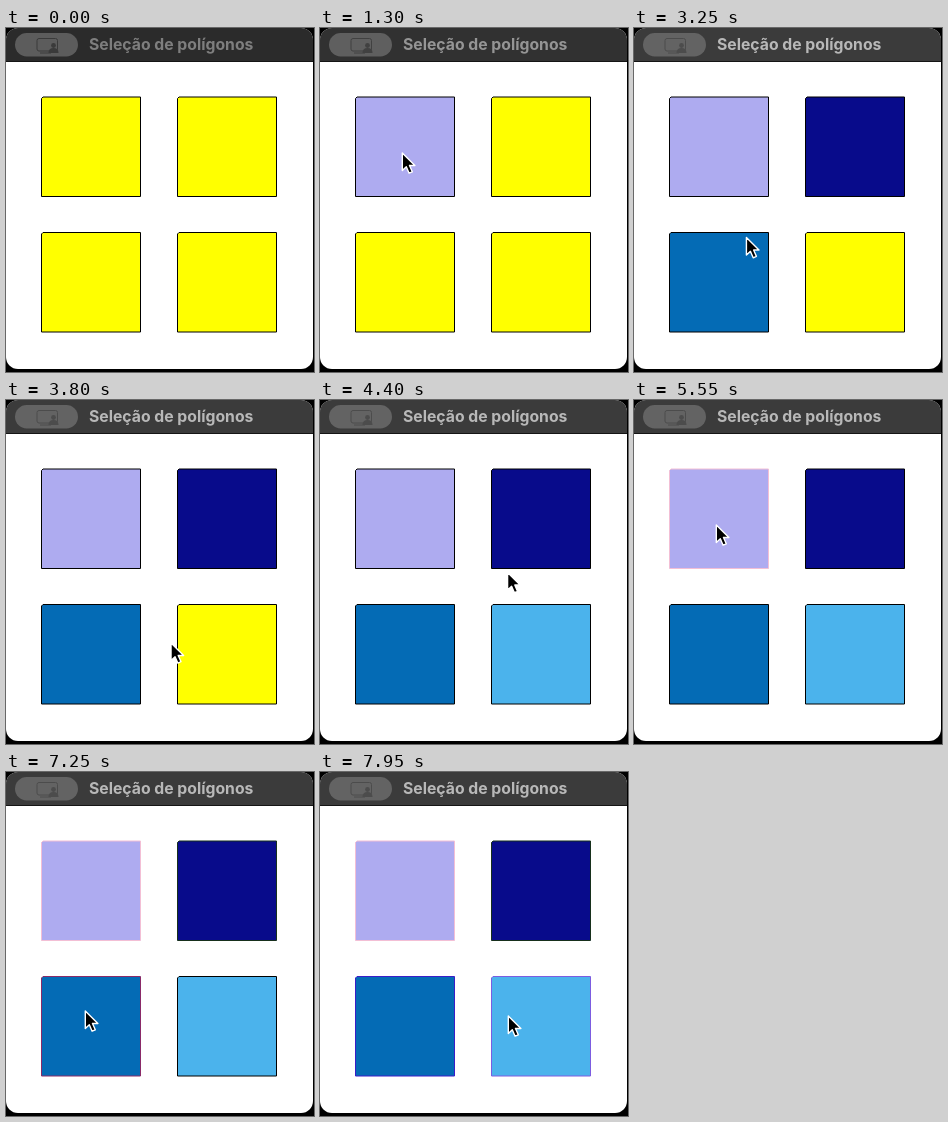
An HTML page that plays this animation: 308 px wide and 344 px high, repeating every 8 s.

```html
<!DOCTYPE html>
<html lang="pt">
<head>
<meta charset="utf-8">
<title>Seleção de polígonos</title>
<style>
  html, body { margin: 0; width: 100%; height: 100%; overflow: hidden; background: #000; }
  svg { display: block; width: 100vw; height: 100vh; }
  text { font: 700 15.75px Inter, sans-serif; }
</style>
</head>
<body>
<svg viewBox="0 0 308 344">
  <defs>
    <clipPath id="window"><rect width="307" height="341" rx="12"/></clipPath>
  </defs>
  <g clip-path="url(#window)">
    <rect width="308" height="344" fill="#fff"/>
    <rect id="bar" width="308" height="34"/>
    <rect y="33" width="308" height="1" fill="#151515"/>
    <rect id="pill" x="9" y="5" width="63" height="23.5" rx="11.75"/>
    <g id="icon">
      <rect x="31" y="10.5" width="20.5" height="12.5" rx="2" fill="none" stroke="currentColor"/>
      <path d="M34 25h11" stroke="currentColor"/>
      <circle cx="47.5" cy="17.5" r="2.4" fill="currentColor"/>
      <path d="M42.5 25q0-5 5-5t5 5z" fill="currentColor"/>
    </g>
    <text id="title" x="83" y="22">Seleção de polígonos</text>
    <g id="squares"></g>
    <path id="cursor" d="M0 0V17.5L4 13.8L6.8 20.2L10 18.8L7.2 12.5H12.6Z"
      fill="#000" stroke="#fff" stroke-width="1.4" stroke-linejoin="round"/>
  </g>
</svg>
<script>
const LOOP = 8000;
const MOVE = 500;
const byId = id => document.getElementById(id);

// Squares run left to right, top to bottom; rest is where the pointer stops in each.
const squares = [
  { rest: { x: 82.3, y: 125 }, fill: '#aeabf0', line: '#f3bfd5' },
  { rest: { x: 187.3, y: 143 }, fill: '#080b8b', line: '#17301c' },
  { rest: { x: 79.3, y: 239 }, fill: '#046bb5', line: '#8a2a68', relined: '#3b1cc8' },
  { rest: { x: 188.3, y: 244 }, fill: '#4bb3ec', line: '#7c5ce0' }
];

// The pointer leaves for a square at a given time and may paint part of it on a click.
const visits = [
  { leave: 50, to: 0, paint: 'fill', click: 1250 },
  { leave: 1500, to: 1, paint: 'fill', click: 2450 },
  { leave: 2935, to: 2, paint: 'fill', click: 3200 },
  { leave: 3450, to: 3, paint: 'fill', click: 3850 },
  { leave: 4080, to: 1 },
  { leave: 4900, to: 0, paint: 'line', click: 5400 },
  { leave: 5800, to: 1, paint: 'line', click: 6400 },
  { leave: 6500, to: 2, paint: 'line', click: 7100 },
  { leave: 7400, to: 3, paint: 'line', click: 7900 }
];
const RELINE = 7350;

const shapes = squares.map((_, i) => {
  const path = document.createElementNS('http://www.w3.org/2000/svg', 'path');
  const x = 35.5 + 136 * (i % 2);
  const y = 69 + 135.5 * Math.floor(i / 2);
  path.setAttribute('d', `M${x} ${y + 1.5}l1.5 -1.5h97.5v99.5h-99z`);
  byId('squares').append(path);
  return path;
});

const clamp = v => Math.min(1, Math.max(0, v));
const ease = v => v * v * (3 - 2 * v);
const mix = (a, b, k) => a + (b - a) * k;
const gray = (from, to, k) => {
  const v = Math.round(mix(from, to, k));
  return `rgb(${v},${v},${v})`;
};

function pointer(t) {
  return visits.reduce((from, { leave, to }) => {
    const k = ease(clamp((t - leave) / MOVE));
    const { x, y } = squares[to].rest;
    return { x: mix(from.x, x, k), y: mix(from.y, y, k) };
  }, { x: 312, y: 335 });
}

function draw(now) {
  const t = now % LOOP;
  const active = clamp((t - 1200) / 250);
  byId('bar').setAttribute('fill', gray(43, 59, active));
  byId('pill').setAttribute('fill', gray(92, 99, active));
  byId('title').setAttribute('fill', gray(126, 184, active));
  byId('icon').style.color = gray(58, 76, active);

  shapes.forEach((shape, i) => {
    const painted = part => visits.some(v => v.to === i && v.paint === part && t >= v.click);
    const { fill, line, relined } = squares[i];
    shape.setAttribute('fill', painted('fill') ? fill : '#ff0');
    shape.setAttribute('stroke', painted('line') ? (t >= RELINE && relined || line) : '#000');
  });

  const { x, y } = pointer(t);
  byId('cursor').setAttribute('transform', `translate(${x} ${y})`);
  requestAnimationFrame(draw);
}
requestAnimationFrame(draw);
</script>
</body>
</html>
```
